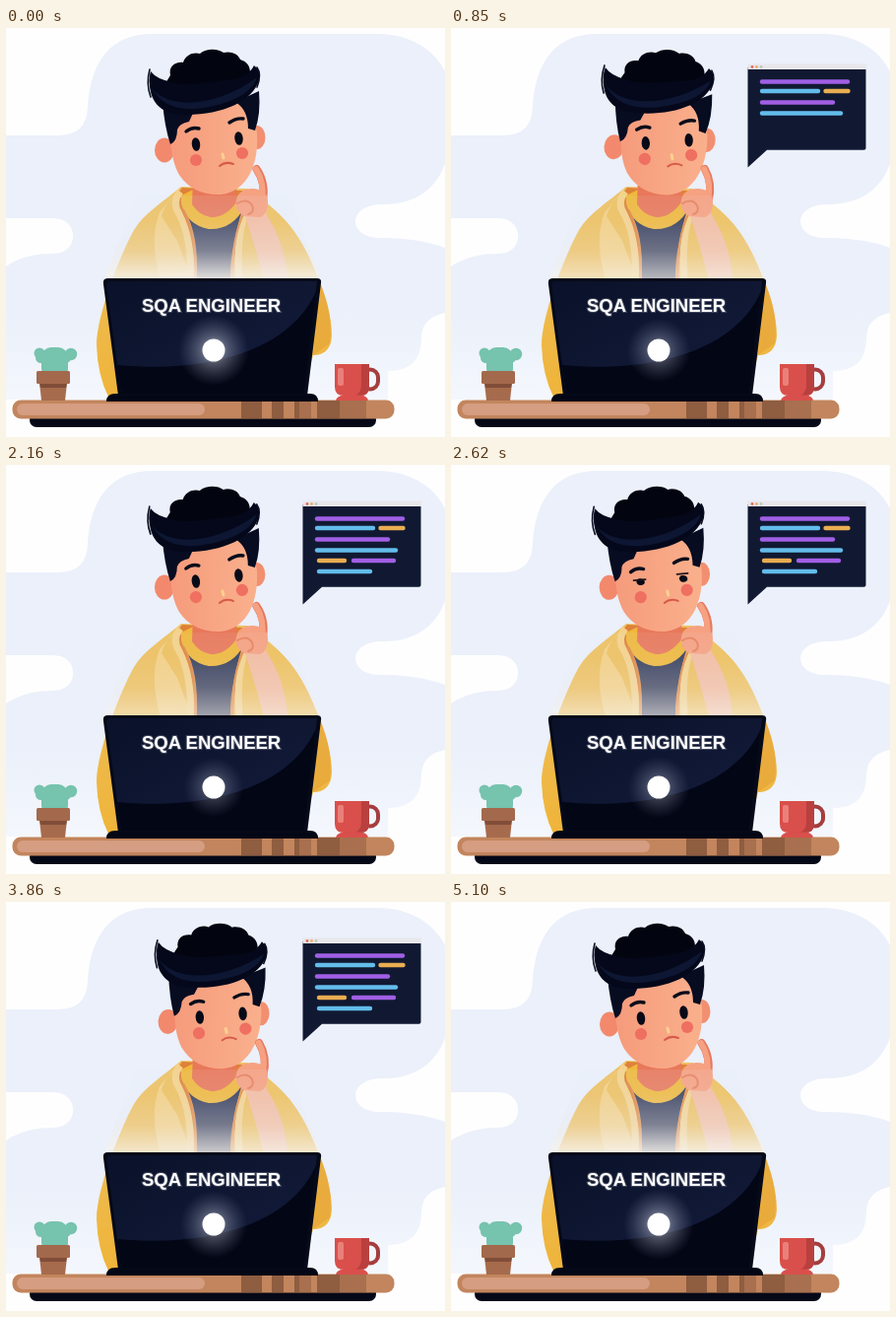
Recreate the animation shown at these times as an HTML page. Size 446 px wide and 415 px high, loop 5170 ms.

```html
<!DOCTYPE html>
<html lang="en">
<head>
<meta charset="utf-8">
<title>SQA engineer</title>
<style>
  html, body { margin: 0; width: 100%; height: 100%; overflow: hidden; background: #fefefe; }
  svg { display: block; width: 100vw; height: 100vh; }
  .label { font: 700 18.5px "Liberation Sans", Arial, sans-serif; fill: #fff; }
  .line { fill: none; stroke-linecap: round; }
</style>
</head>
<body>
<svg viewBox="0 0 446 415" xmlns="http://www.w3.org/2000/svg">
  <defs>
    <linearGradient id="sky" gradientUnits="userSpaceOnUse" x1="0" y1="290" x2="0" y2="377">
      <stop offset="0" stop-color="#ebf0fa"/><stop offset="1" stop-color="#f4f7fd"/>
    </linearGradient>
    <linearGradient id="beam" x1="0" y1="0" x2="0" y2="1">
      <stop offset="0" stop-color="#dfe8fa" stop-opacity=".1"/>
      <stop offset=".3" stop-color="#e2e9f8" stop-opacity=".16"/>
      <stop offset=".65" stop-color="#eceae9" stop-opacity=".4"/>
      <stop offset="1" stop-color="#f7f4ee" stop-opacity=".92"/>
    </linearGradient>
    <linearGradient id="coat" x1="0" y1="0" x2="0" y2="1">
      <stop offset="0" stop-color="#eec263"/><stop offset="1" stop-color="#efb43a"/>
    </linearGradient>
    <linearGradient id="lid" x1="0" y1="0" x2="1" y2="1">
      <stop offset="0" stop-color="#0a1129"/><stop offset="1" stop-color="#141d3d"/>
    </linearGradient>
    <linearGradient id="skin" x1="0" y1="0" x2="1" y2="0">
      <stop offset="0" stop-color="#f59b7c"/><stop offset="1" stop-color="#fab08c"/>
    </linearGradient>
    <radialGradient id="halo">
      <stop offset="0" stop-color="#fff" stop-opacity=".75"/>
      <stop offset=".4" stop-color="#c8cde0" stop-opacity=".4"/>
      <stop offset="1" stop-color="#8790b0" stop-opacity="0"/>
    </radialGradient>
  </defs>

  <rect width="446" height="415" fill="#fefefe"/>
  <path fill="url(#sky)" d="M148 6H378C408 6 434 20 446 44V138C436 164 416 179 382 179C346 179 347 213 380 213Q420 213 446 223V289Q422 294 422 315Q422 348 388 348V377H0V242Q18 229 48 229C75 229 75 193 48 193H0V109H53Q82 109 83 80C86 32 108 6 148 6Z"/>

  <!-- body -->
  <path fill="url(#coat)" d="M178 161C160 176 139 189 130 205C118 226 92 290 92 322Q93 352 104 374H300L312 332Q330 332 331 312C331 294 325 272 318 256C310 236 301 216 288 200C276 186 262 174 245 163Z"/>
  <path fill="#e6a136" opacity=".55" d="M318 256Q333 290 329 320L312 332Z"/>
  <path fill="#f7d996" d="M176 164C166 174 160 182 158 191L174 216L189 256H157C150 230 148 209 156 187Z" opacity=".65"/>
  <path fill="#df8139" d="M179 162C171 171 171 180 177 188C188 206 193 231 191 256H231C230 228 238 207 249 187L240 165Z"/>
  <path fill="#363d5a" d="M180 178Q206 202 240 182C235 205 227 228 228 256H194C195 226 190 202 180 178Z"/>
  <path fill="#efb83c" d="M178 170L190 164Q207 192 230 172L243 180Q231 205 206 204Q184 200 178 178Z"/>
  <path fill="#e8785a" d="M190 150H234V177Q222 193 208 192Q196 190 189 179Z"/>
  <path fill="none" stroke="#f4d28a" stroke-width="7" d="M177 166Q168 177 176 189Q189 214 187 254M243 190Q234 210 237 254"/>
  <path fill="none" stroke="#e08a45" stroke-width="2" d="M180 184Q196 212 192 254M242 187Q229 213 231 254"/>
  <path fill="#f4bca0" d="M240 183L264 183L291 238L286 256H262Q252 216 240 183Z"/>
  <path fill="#efc05a" d="M266 181Q300 204 316 254H286Q284 220 264 188Z"/>

  <!-- head -->
  <g id="head">
    <ellipse cx="161" cy="124" rx="10" ry="12.5" fill="#f2896d"/>
    <ellipse cx="255" cy="111" rx="8.5" ry="12" fill="#f28f70"/>
    <path fill="url(#skin)" d="M167 82C167 112 166 130 176 149Q190 170 218 169C246 166 257 137 255 107L250 72Z"/>
    <path fill="#070c21" d="M159 75Q161 100 167 118Q174 115 174 103Q176 97 186 95L192 82ZM233 75Q246 83 246 102L253 104Q259 87 257 64Z"/>
    <path fill="#02040f" d="M162 58Q164 52 167 48C165 39 172 34 180 35C182 27 191 24 197 26C204 20 216 21 221 25C228 23 236 26 238 32C245 34 248 39 248 45L240 70H166Z"/>
    <path fill="#04081a" d="M147 44Q144 53 147 65C151 82 166 89 184 88C220 88 251 74 257 53Q259 43 252 38Q246 50 229 52C210 54 189 60 169 55Q153 52 147 44Z"/>
    <path fill="#0d1632" d="M149 62C168 84 216 79 255 50Q250 66 225 75C202 83 164 90 149 62Z"/>
    <path class="line" stroke="#080d22" stroke-width="1.6" d="M146 42Q142 57 147 70M255 40Q260 47 255 60"/>
    <path id="brows" class="line" stroke="#0a0d1a" stroke-width="3.4" d="M183 105Q189 100 196 102M227 96Q234 91 241 92"/>
    <g id="eyes" fill="#080b17">
      <ellipse cx="193" cy="118" rx="4.2" ry="6.8" transform="rotate(-7 193 118)"/>
      <ellipse cx="236.500" cy="112" rx="4.2" ry="6.8" transform="rotate(-7 236.500 112)"/>
    </g>
    <path id="lids" class="line" stroke="#22151b" stroke-width="1.8" d="M186 117L198 116M230 111L241 110"/>
    <circle cx="193" cy="134" r="6.1" fill="#ef6f60"/>
    <circle cx="240" cy="127" r="6.1" fill="#ef6f60"/>
    <path class="line" stroke="#fbd18f" stroke-width="3" d="M220 128L221 132"/>
    <path class="line" stroke="#d65b49" stroke-width="2" d="M217 140Q223 135 231 138"/>
  </g>

  <!-- hand -->
  <g id="finger" class="line">
    <path stroke="#e57860" stroke-width="8" d="M254.500 143Q264 157 261 175"/>
    <path stroke="#f6a181" stroke-width="6" d="M254 143Q263 157 260 175"/>
  </g>
  <path fill="#f6a181" d="M235 171Q239 163 250 163Q266 163 266 177Q266 189 258 192L242 191Q230 184 235 171Z"/>
  <path class="line" stroke="#e8825f" stroke-width="2" d="M235 178Q245 172 250 180Q253 187 246 189"/>

  <path id="light" fill="url(#beam)" d="M133 170H288L320 256H99Z"/>

  <!-- desk -->
  <rect x="24" y="390" width="352" height="15" rx="7" fill="#040817"/>
  <rect x="6.500" y="377.500" width="388" height="19" rx="8.5" fill="#c2855d"/>
  <rect x="11" y="381" width="191" height="12" rx="6" fill="#d59d81"/>
  <path fill="#8f5d40" d="M239 378h21v18h-21zM270 378h12v18h-12zM293 378h5v18h-5zM316 378h23v18h-23z"/>
  <path fill="#a8704e" d="M298 378h12v18h-12zM339 378h27v18h-27z"/>

  <!-- laptop -->
  <path fill="#030715" d="M102 379Q102 371 111 371H309Q317 371 317 379Z"/>
  <path fill="#050918" d="M103 254H316Q321 254 320 259L306 373H114L99 260Q98 254 103 254Z"/>
  <path fill="url(#lid)" d="M104 257H316L303 371H117L102 260Z"/>
  <path fill="#030615" d="M315 267C290 325 210 351 113 342L117 371H303Z"/>
  <circle id="glow" cx="211" cy="327" r="36" fill="url(#halo)"/>
  <circle cx="211" cy="327" r="11.5" fill="#fff"/>
  <text class="label" x="138" y="287.500" stroke="#fff" stroke-opacity=".2" stroke-width="2">SQA ENGINEER</text>

  <!-- cactus -->
  <g fill="#76c3ae">
    <rect x="36" y="324" width="27" height="32" rx="10"/>
    <circle cx="34" cy="330" r="5.5"/><circle cx="66" cy="331" r="6.2"/>
    <rect x="30" y="329" width="36" height="11" rx="5.5"/>
  </g>
  <path fill="#a66b4d" d="M34 360H62L60 378H36Z"/>
  <path fill="#804d38" d="M34 360H62L61 365H35Z"/>
  <rect x="31" y="348" width="34" height="13" rx="1.5" fill="#a3694c"/>

  <!-- mug -->
  <rect x="362" y="346.500" width="16" height="20" rx="8" fill="none" stroke="#a53d3e" stroke-width="4"/>
  <path fill="#d94f4b" d="M334 341H369V364Q369 373 360 373H343Q334 373 334 364Z"/>
  <path fill="#b9403f" d="M361 341H369V364Q369 373 360 373H354Q361 371 361 362Z"/>
  <rect x="337" y="345" width="6" height="18" rx="2" fill="#e98079"/>
  <path fill="#d94f4b" d="M335 378Q336 373 344 372.500H360Q367 373 368 378Z"/>

  <!-- speech window -->
  <g id="bubble">
    <path fill="#111932" d="M301.500 40H421.500V122Q421.500 123.700 419.500 123.700H321L301.500 141.500Z"/>
    <path fill="#e8e7eb" d="M301.500 36.500H422V42H301.500Z"/>
    <circle cx="306" cy="39.500" r="1.4" fill="#e46b5e"/>
    <circle cx="310.500" cy="39.500" r="1.4" fill="#e5b062"/>
    <circle cx="315" cy="39.500" r="1.4" fill="#bfc5c8"/>
    <g id="code"></g>
  </g>
</svg>
<script>
const LOOP = 5170, STEP = 77;
const $ = id => document.getElementById(id);
const purple = '#a05fe5', blue = '#63bcea', orange = '#e9ad51';

// x, y, length, colour, typing start and end, erasing start and end
const lines = [
  [316, 54.5, 87, purple, 390, 500, 4720, 4800],
  [316, 64, 57, blue, 470, 590, 4660, 4740],
  [380.5, 64, 23, orange, 560, 640, 4610, 4680],
  [316, 75.5, 72, purple, 610, 730, 4540, 4630],
  [316, 86.5, 80, blue, 700, 840, 4460, 4560],
  [318, 97, 26, orange, 880, 970, 4400, 4480],
  [353, 97, 41, purple, 950, 1090, 4325, 4410],
  [318, 108, 52, blue, 1080, 1230, 4130, 4300]
];
const strokes = lines.map(([x, y, , color]) => {
  const path = document.createElementNS('http://www.w3.org/2000/svg', 'path');
  path.setAttribute('class', 'line');
  path.setAttribute('stroke', color);
  path.setAttribute('stroke-width', 4.4);
  $('code').append(path);
  return path;
});

const tilt = [[0, 0], [230, 0], [850, 3.8], [1000, 4], [1620, .9], [1900, 0], [2620, -.3],
  [3000, 0], [3390, 1.4], [4180, 4], [4320, 3.7], [4970, 0], [LOOP, 0]];
const shine = [[0, 1], [230, 1], [850, .6], [1620, .25], [2620, .5], [3390, 1],
  [4320, .6], [4970, 1], [LOOP, 1]];
const blink = [[0, 0], [2440, 0], [2540, 1], [2720, 1], [2820, 0], [LOOP, 0]];
const popup = [[0, 0], [230, 0], [390, 1.02], [470, 1], [4780, 1], [4960, 0], [LOOP, 0]];

function at(keys, t) {
  const i = Math.max(1, keys.findIndex(key => key[0] >= t));
  const [t0, v0] = keys[i - 1], [t1, v1] = keys[i];
  const u = (t - t0) / (t1 - t0);
  return v0 + (v1 - v0) * u * u * (3 - 2 * u);
}
const ramp = (t, a, b) => Math.min(1, Math.max(0, (t - a) / (b - a)));
const scaleAbout = (x, y, sx, sy) => `translate(${x} ${y}) scale(${sx} ${sy}) translate(${-x} ${-y})`;

function draw(time) {
  const t = Math.floor((time % LOOP) / STEP + .03) * STEP;
  const angle = at(tilt, t), level = at(shine, t), closed = at(blink, t), size = at(popup, t);

  $('head').setAttribute('transform', `translate(${angle * .25} 0) rotate(${angle} 212 176)`);
  $('finger').setAttribute('transform', `rotate(${angle * 1.2} 258 184)`);
  $('eyes').setAttribute('transform', scaleAbout(214, 119, 1, 1 - .5 * closed));
  $('brows').setAttribute('transform', `translate(0 ${3.5 * closed})`);
  $('lids').setAttribute('opacity', closed);
  $('light').setAttribute('opacity', .4 + .6 * level);
  $('glow').setAttribute('opacity', .4 + .5 * level);
  $('glow').setAttribute('r', 27 + 9 * level);
  $('bubble').setAttribute('transform', scaleAbout(302, 141, size, size));
  $('bubble').setAttribute('opacity', Math.min(1, size));

  lines.forEach(([x, y, length, , a, b, c, d], i) => {
    const shown = ramp(t, a, b) * (1 - ramp(t, c, d));
    strokes[i].setAttribute('d', shown ? `M${x} ${y}h${length * shown}` : '');
  });
}

const start = performance.now();
function tick() {
  draw(performance.now() - start);
  requestAnimationFrame(tick);
}
tick();
</script>
</body>
</html>
```
